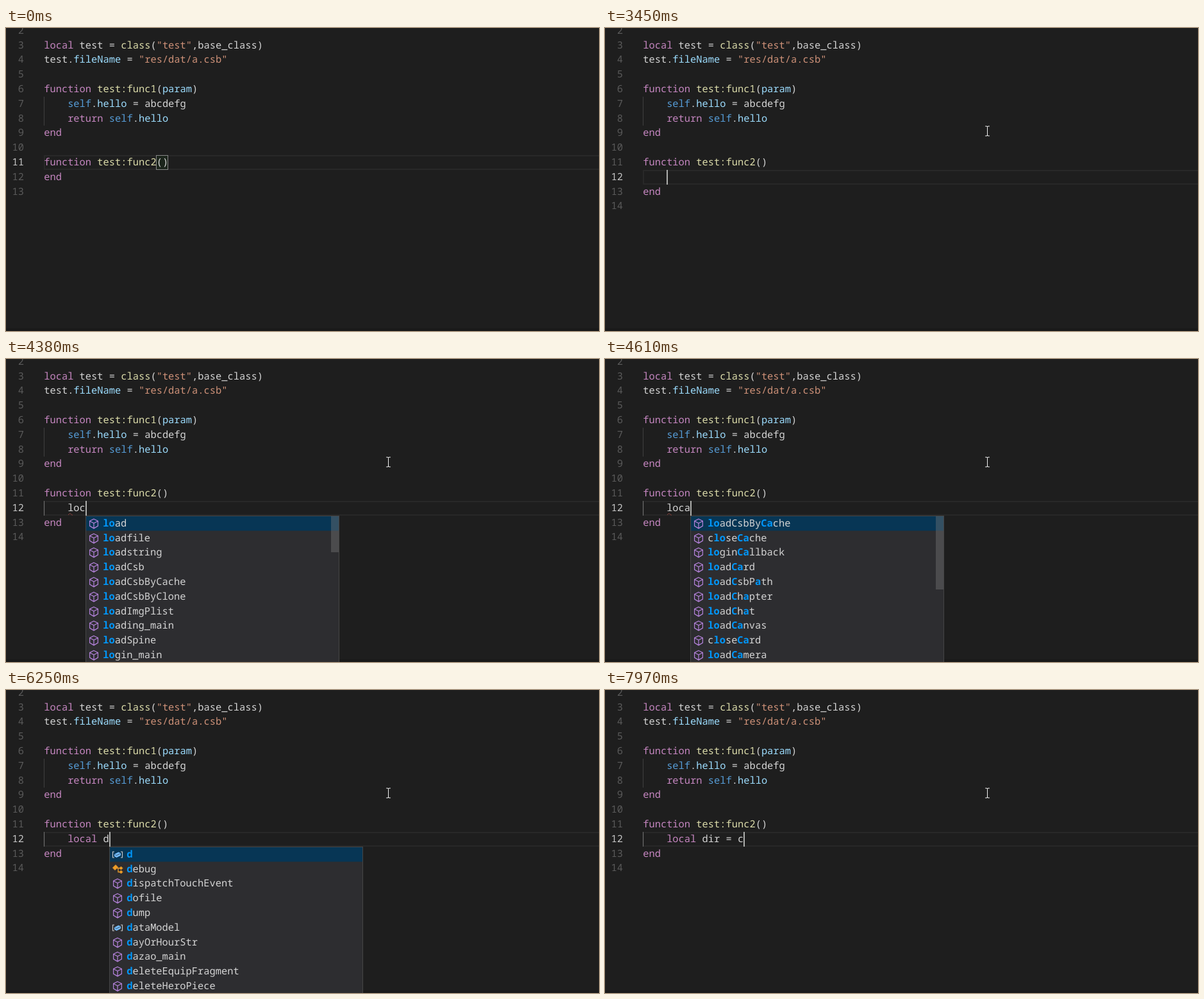
Write an HTML page that moves like this. It is 925 px wide and 472 px high and loops after 8 s.

```html
<!DOCTYPE html>
<html lang="en">
<head>
<meta charset="utf-8">
<title>Code completion</title>
<style>
html, body { margin: 0; width: 100%; height: 100%; overflow: hidden; background: #1e1e1e; }
svg { display: block; }
text {
  font: 15.4px "Noto Sans Mono", "DejaVu Sans Mono", monospace;
  white-space: pre;
  text-rendering: geometricPrecision;
}
</style>
</head>
<body>
<svg id="stage" width="925" height="472" viewBox="0 0 925 472"></svg>
<script>
const LOOP = 8000, ROW = 22.8;
const stage = document.getElementById('stage');

const COLORS = {
  k: '#c586c0', w: '#d4d4d4', f: '#dcdcaa', p: '#9cdcfe',
  s: '#ce9178', b: '#569cd6', hit: '#0097fb'
};

// Code lines as alternating colour keys and text
const CODE = {
  3: ['k', 'local ', 'w', 'test = ', 'f', 'class', 'w', '(', 's', '"test"', 'w', ',base_class)'],
  4: ['w', 'test.', 'p', 'fileName', 'w', ' = ', 's', '"res/dat/a.csb"'],
  6: ['k', 'function ', 'f', 'test:func1', 'w', '(', 'p', 'param', 'w', ')'],
  7: ['b', '    self', 'w', '.', 'p', 'hello', 'w', ' = abcdefg'],
  8: ['k', '    return ', 'b', 'self', 'w', '.', 'p', 'hello'],
  9: ['k', 'end'],
  11: ['k', 'function ', 'f', 'test:func2', 'w', '()']
};

// Menu entries: ~ toggles the highlight, a leading @ or # picks the icon
const lead = (n, words) => words.split(' ').map(w => {
  const mark = /^[@#]/.test(w) ? w[0] : '';
  const s = w.slice(mark.length);
  return mark + '~' + s.slice(0, n) + '~' + s.slice(n);
});
const LO = 'load loadfile loadstring loadCsb loadCsbByCache loadCsbByClone ' +
  'loadImgPlist loading_main loadSpine login_main';
const MENUS = {
  l: { items: lead(1, LO), bar: 0 },
  lo: { items: lead(2, LO), bar: 56 },
  loc: {
    items: ['~lo~ad~C~sb', '~lo~ad~C~sbByCache', '~lo~ad~C~sbByClone', 'c~lo~se~C~lient',
      'dia~lo~g~C~lose', 'ye~l~l~o~w~C~olor', 'b~l~o~c~k_main', '~l~ist~C~olumn',
      '~l~ayer~C~olor', 'a~l~l~oc~Size'],
    bar: 90
  },
  loca: {
    items: ['~lo~adCsbBy~Ca~che', 'c~lo~se~Ca~che', '~lo~gin~Ca~llback', '~lo~ad~Ca~rd',
      '~lo~ad~C~sbP~a~th', '~lo~ad~C~h~a~pter', '~lo~ad~C~h~a~t', '~lo~ad~Ca~nvas',
      'c~lo~se~Ca~rd', '~lo~ad~Ca~mera'],
    bar: 114
  },
  d: {
    items: lead(1, '@d #debug dispatchTouchEvent dofile dump @dataModel dayOrHourStr ' +
      'dazao_main deleteEquipFragment deleteHeroPiece'),
    bar: 0
  },
  dir: {
    items: ['create~Dir~ectory', '~di~splayHe~r~o', '~di~splaySc~r~ollView',
      '~di~splaySc~r~ollView_Horizontal', '@~D~ECO~R~AT~I~ON_ROOM', 'cc~Dr~aw~I~nit',
      'getDropBy~Dr~op~I~d', '@~D~A~I~LY_MISSION_~R~ESET', 'cc~Dr~awC~i~rcle',
      'cc~Dr~awC~i~rcleScale'],
    bar: 113
  }
};

const TYPED = [[0, ''], [3540, 'l'], [3920, 'lo'], [4380, 'loc'], [4530, 'loca'],
  [5070, 'local'], [5930, 'local '], [6250, 'local d'], [6320, 'local di'],
  [6400, 'local dir'], [6860, 'local dir '], [7180, 'local dir ='],
  [7420, 'local dir = '], [7970, 'local dir = c']];
const MENU_AT = [[0, ''], [3610, 'l'], [3920, 'lo'], [4460, 'loc'], [4610, 'loca'],
  [5070, ''], [6250, 'd'], [6400, 'dir'], [6950, '']];
const CARET = [[0, 0], [1530, 1], [1990, 0], [2450, 1], [2990, 0], [3450, 1],
  [5610, 0], [5930, 1]];
const END_ERROR = [[0, 0], [5150, 1], [6250, 0], [7250, 1], [7970, 0]];

const at = (table, t) => table.filter(e => e[0] <= t).pop()[1];
const lineTop = n => Math.floor(221.3 + (n - 12) * ROW);
const colX = c => Math.floor(59.39 + c * 9.26);
const rect = (x, y, w, h, fill, more = '') =>
  `<rect x="${x}" y="${y}" width="${w}" height="${h}" fill="${fill}" ${more}/>`;
const path = (d, stroke, width = 1, fill = 'none') =>
  `<path d="${d}" stroke="${stroke}" stroke-width="${width}" fill="${fill}"/>`;
const span = (s, fill, bold) =>
  `<tspan fill="${fill}"${bold ? ' font-weight="700"' : ''}>${s}</tspan>`;

function codeLine(n, parts) {
  let s = '';
  for (let i = 0; i < parts.length; i += 2) s += span(parts[i + 1], COLORS[parts[i]]);
  return `<text x="59.2" y="${lineTop(n) + 16}">${s}</text>`;
}

function squiggle(x, y, waves, color) {
  return path(`M${x} ${y}` + 'l2.3 -2.5h1l2.3 2.5h1.4'.repeat(waves), color);
}

function icon(mark, x, y) {
  let s;
  if (mark === '@') {
    s = path('M-5 -4.5h-2.5v9h2.5M5 -4.5h2.5v9h-2.5', '#c5c5c5', 1.2) +
      path('M-4.5 -.5L1.5 -3.5L4.5 -2V1L-1.5 4L-4.5 2.5Z', '#75beff', 1, '#75beff') +
      path('M-3.8 0L-1.5 1.2L3.8 -1.5', '#2d2d30', .8);
  } else if (mark === '#') {
    s = path('M-7.5 -2.5L-3 -7L.5 -3.5L-4 1Z', '#ee9d28', 1, '#ee9d28') +
      path('M-1 -2H4M1 -2V4H4', '#ee9d28', 1.3) +
      path('M3 -2L5.5 -4.5L8 -2L5.5 .5ZM3 4L5.5 1.5L8 4L5.5 6.5Z', '#ee9d28', .8, '#ee9d28');
  } else {
    s = path('M0 -7.2L6.4 -4V3.6L0 7.4L-6.4 3.6V-4ZM-6.4 -4L0 -.6L6.4 -4M0 -.6V7.4',
      '#b180d7', 1.25);
  }
  return `<g transform="translate(${x} ${y})">${s}</g>`;
}

function menu({ items, bar }, x) {
  let s = rect(x + .5, 244.5, 395, 240, '#2d2d30', 'stroke="#454545"') +
    rect(x + 1, 245, 394, 22.5, '#073655');
  items.forEach((item, i) => {
    const y = Math.floor(261.3 + i * ROW);
    const mark = /^[@#]/.test(item) ? item[0] : '';
    const text = item.slice(mark.length).split('~')
      .map((p, j) => p && span(p, j % 2 ? COLORS.hit : COLORS.w, j % 2)).join('');
    s += icon(mark, x + 13, y - 4.5) + `<text x="${x + 27.2}" y="${y}">${text}</text>`;
  });
  if (bar) s += rect(x + 383, 245, 12, bar, '#797979', 'fill-opacity=".4"');
  return s;
}

function pointer(t) {
  if (t < 760) return '';
  let x, y;
  if (t < 1680) {
    const p = Math.min(10, Math.floor((t - 760) / 77)) / 10;
    const e = p * p * (3 - 2 * p);
    x = 834 - 535 * e;
    y = 464 - 256 * Math.sin(p * Math.PI / 2);
  } else {
    const p = Math.min(3, Math.floor((t - 1680) / 80) + 1) / 3;
    const e = p * (2 - p);
    x = 299 + 297 * e;
    y = 208 - 48 * e;
  }
  const d = 'M-3.5 -7.5H-1L0 -6.5L1 -7.5H3.5M0 -6.5V6.5M-3.5 7.5H-1L0 6.5L1 7.5H3.5';
  return `<g transform="translate(${Math.round(x) + .5} ${Math.round(y) + .5})">` +
    path(d, '#111', 2.4) + path(d, '#f0f0f0', 1.1) + '</g>';
}

function draw(t) {
  const split = t >= 2450;
  const typed = at(TYPED, t), menuKey = at(MENU_AT, t);
  const active = split ? 12 : 11, top = lineTop(active);
  const endLine = split ? 13 : 12;
  const col = !split ? 21 : t < 2530 ? 0 : 4 + typed.length;

  let s = rect(0, 0, 925, 472, '#1e1e1e') + rect(0, 468, 925, 4, '#191919') +
    rect(60, top + 1, 880, 21, 'none', 'stroke="#282828" stroke-width="2"') +
    rect(59, 107, 1, 45, '#404040');
  if (typed) s += rect(59, 221, 1, 23, '#707070');
  if (!split) s += rect(234.5, 198.5, 18, 22, '#1c251c', 'stroke="#888"');

  for (let n = 2; n <= endLine + 1; n++) {
    s += `<text x="28" y="${lineTop(n) + 16}" text-anchor="end" fill="${
      n === active ? '#c6c6c6' : '#5a5a5a'}">${n}</text>`;
    if (CODE[n]) s += codeLine(n, CODE[n]);
  }
  s += codeLine(endLine, ['k', 'end']);

  if (typed) {
    const parts = t < 5150 ? ['w', '    ' + typed]
      : ['k', '    local', 'w', typed.slice(5)];
    s += codeLine(12, parts);
    if (t < 5150) s += squiggle(97, 243, 1, '#8a3f3a');
  }
  if (at(END_ERROR, t)) s += squiggle(59, 265, 4, '#c0392f');
  if (menuKey) s += menu(MENUS[menuKey], colX(col));
  if (at(CARET, t)) s += rect(colX(col), top, 2, 23, '#aeafad');
  return s + pointer(t);
}

let shown = '';
const start = performance.now();
function tick() {
  const s = draw((performance.now() - start) % LOOP);
  if (s !== shown) stage.innerHTML = shown = s;
  requestAnimationFrame(tick);
}
tick();
</script>
</body>
</html>
```
